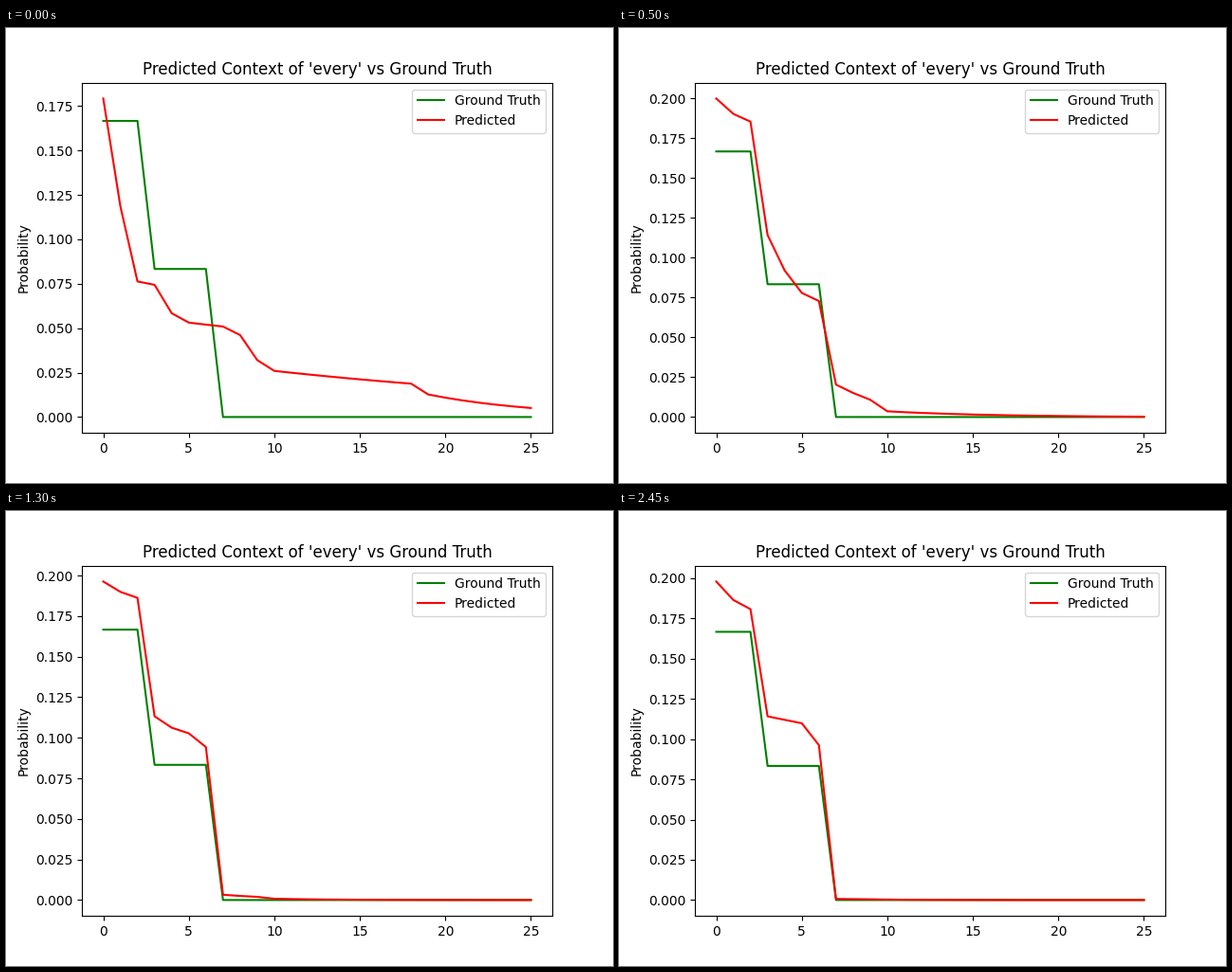
These frames come from a looping animation (640 px wide and 480 px high, 2.5 s). A matplotlib script:

```python
import numpy as np
import matplotlib.pyplot as plt
from matplotlib.animation import FuncAnimation

FRAMES, INTERVAL = 50, 50
RANKS = np.arange(26)
TRUTH = np.select([RANKS < 3, RANKS < 7], [1 / 6, 1 / 12], 0.0)


def logits(**knots):
    """Straight segments in log space between weights given per rank."""
    ranks = [int(name[1:]) for name in knots]
    return np.interp(RANKS, ranks, np.log(list(knots.values())))


# Turning points of the sorted prediction at four stages of training.
STAGES = {
    0: logits(r0=1795, r1=1188, r2=764, r3=745, r4=585, r5=532, r7=510,
              r8=462, r9=321, r10=260, r18=188, r19=127, r25=51),
    6: logits(r0=2007, r1=1815, r2=1732, r3=1132, r4=787, r5=571, r6=519,
              r8=274, r9=184, r10=83, r16=43, r20=24, r25=7.5),
    14: logits(r0=1913, r2=1876, r3=1104, r4=996, r6=909, r7=121, r9=69,
               r10=18, r25=0.8),
    49: logits(r0=1982, r1=1867, r2=1810, r3=1143, r5=1100, r6=964, r7=7,
               r9=4.5, r25=0.01),
}


def progress(step):
    """Learning is steady at first, then slows down logarithmically."""
    return np.log(np.asarray(step) + 6)


def predicted(step):
    times = progress(list(STAGES))
    columns = np.transpose(list(STAGES.values()))
    weights = np.exp([np.interp(progress(step), times, c) for c in columns])
    return weights / weights.sum()


fig, ax = plt.subplots(figsize=(6.4, 4.8), dpi=100)
ax.plot(RANKS, TRUTH, color="green", label="Ground Truth")
line, = ax.plot(RANKS, predicted(0), color="red", label="Predicted")
ax.set_title("Predicted Context of 'every' vs Ground Truth")
ax.set_ylabel("Probability")
ax.legend(loc="upper right")


def update(step):
    line.set_ydata(predicted(step))
    ax.relim()
    ax.autoscale_view()
    return line,


anim = FuncAnimation(fig, update, frames=FRAMES, interval=INTERVAL,
                     repeat=True, repeat_delay=0, blit=False)
plt.show()
```
